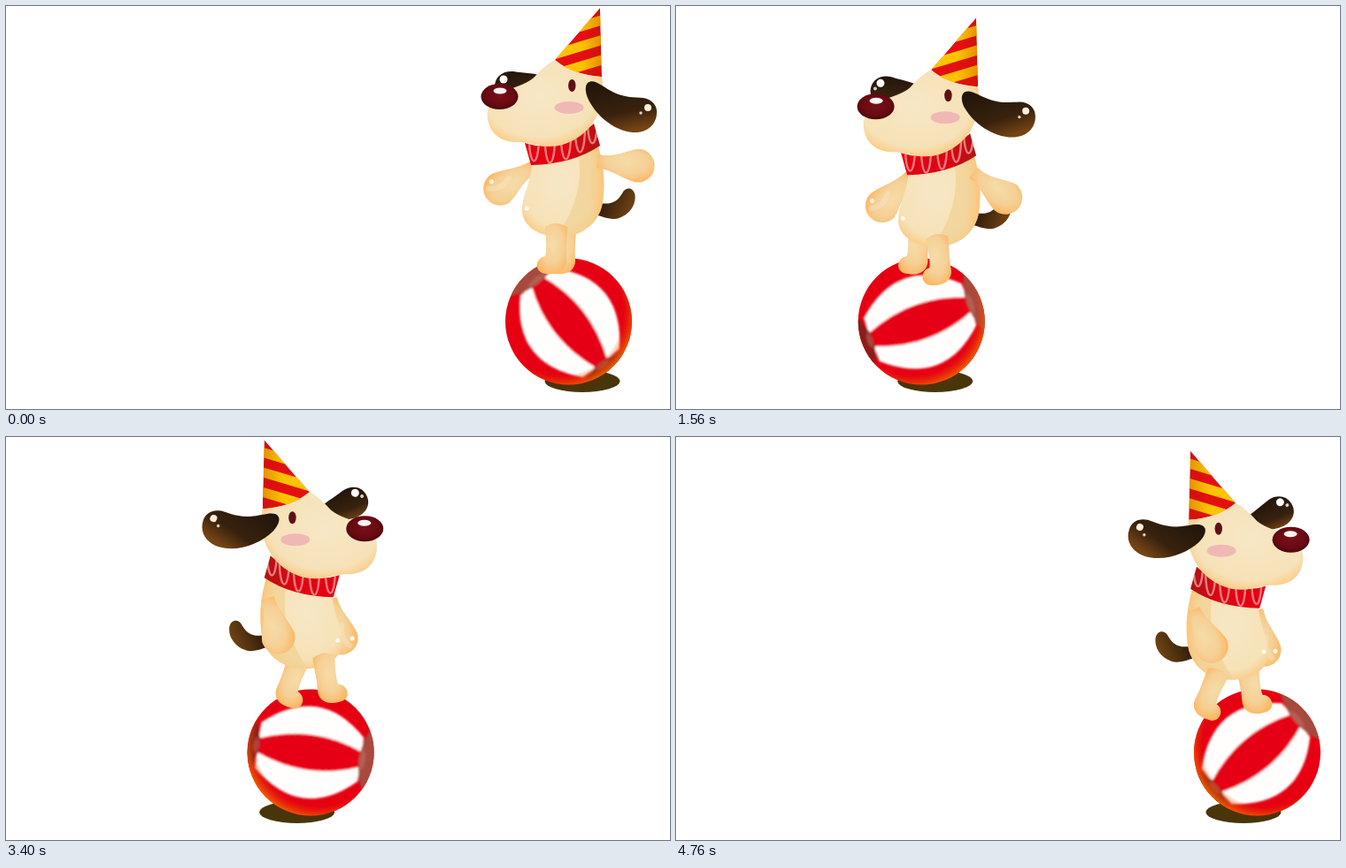
An HTML page for the animation above (4800 ms loop, 750 px wide and 456 px high).

```html
<!DOCTYPE html>
<html lang="en">
<head>
<meta charset="utf-8">
<title>Dog on a ball</title>
<style>
html, body { margin: 0; width: 100%; height: 100%; overflow: hidden; background: #fff; }
svg { display: block; width: 750px; height: 456px; }
</style>
</head>
<body>
<svg viewBox="0 0 750 456" xmlns="http://www.w3.org/2000/svg">
<defs>
  <radialGradient id="skin" cx=".45" cy=".42" r=".62">
    <stop offset="0" stop-color="#f7e7c5"/><stop offset=".76" stop-color="#f6e2b8"/><stop offset="1" stop-color="#fcc880"/>
  </radialGradient>
  <radialGradient id="limb" cx=".5" cy=".42" r=".62">
    <stop offset="0" stop-color="#f6dca8"/><stop offset=".6" stop-color="#f5d096"/><stop offset="1" stop-color="#fdb762"/>
  </radialGradient>
  <linearGradient id="side" x1="0" y1="0" x2="1" y2="0">
    <stop offset="0" stop-color="#efd49a"/><stop offset=".7" stop-color="#f1d192"/><stop offset="1" stop-color="#fcc070"/>
  </linearGradient>
  <linearGradient id="ear" x1=".2" y1="0" x2=".5" y2="1">
    <stop offset="0" stop-color="#22150a"/><stop offset=".65" stop-color="#38220e"/><stop offset="1" stop-color="#744414"/>
  </linearGradient>
  <linearGradient id="tail" gradientUnits="userSpaceOnUse" x1="672" y1="222" x2="706" y2="238">
    <stop offset="0" stop-color="#2e1c0b"/><stop offset="1" stop-color="#754614"/>
  </linearGradient>
  <radialGradient id="nose" cx=".5" cy=".45" r=".55">
    <stop offset="0" stop-color="#780f18"/><stop offset=".7" stop-color="#690a12"/><stop offset="1" stop-color="#4c070c"/>
  </radialGradient>
  <radialGradient id="shade" gradientUnits="userSpaceOnUse" cx="-9" cy="-10" r="85">
    <stop offset=".83" stop-color="#e04000" stop-opacity="0"/><stop offset="1" stop-color="#f06400" stop-opacity=".95"/>
  </radialGradient>
  <linearGradient id="band" x1="0" y1="0" x2="1" y2="0">
    <stop offset="0" stop-color="#e60012"/><stop offset=".6" stop-color="#dd0613"/><stop offset="1" stop-color="#b01414"/>
  </linearGradient>
  <linearGradient id="hatShade" x1="0" y1="0" x2="1" y2="0">
    <stop offset=".55" stop-color="#a01800" stop-opacity="0"/><stop offset="1" stop-color="#a01800" stop-opacity=".3"/>
  </linearGradient>
  <clipPath id="round"><circle r="71.5"/></clipPath>
  <clipPath id="cone"><path id="hatPath" d="M671,2 L620,61 Q640,78 673,80 Z"/></clipPath>
  <clipPath id="neck"><path id="collarPath" d="M586,155 Q625,168 664,133 L671,158 Q640,179 593,180 Z"/></clipPath>
  <filter id="soft" x="-10%" y="-10%" width="120%" height="120%"><feGaussianBlur stdDeviation="1.2"/></filter>
  <path id="arm" d="M0,-7 C22,-6 30,-16 46,-19 A19,19 0 1 1 46,19 C30,17 18,8 0,8 Z" fill="url(#limb)"/>
  <path id="leg" d="M-12,-4 C-11,10 -10,22 -12,29 C-24,31 -25,49 -10,49 C4,51 13,44 12,32 C11,20 13,8 13,-4 Q0,-12 -12,-4 Z" fill="url(#limb)"/>
</defs>
<g id="scene">
  <g id="ball">
    <ellipse cx="15.5" cy="67.5" rx="42.5" ry="12.5" fill="#49350a"/>
    <circle r="71.5" fill="#e60012"/>
    <g clip-path="url(#round)">
      <g id="spin">
        <g filter="url(#soft)">
          <path d="M-57,-25 Q0,-79 60,-26 V26 Q0,79 -57,25 Z" fill="#fffefc"/>
          <path d="M-58,-8 Q0,-32 60,-8 V8 Q0,32 -58,8 Z" fill="#e60012"/>
          <path d="M-63,-34 Q-47,0 -63,34 L-80,34 V-34 Z" fill="#a8483e"/>
          <path d="M-59,-14 Q-52,0 -59,14 Q-66,0 -59,-14 Z" fill="#bd7468" opacity=".5"/>
          <path d="M66,-28 Q51,0 66,28 L80,28 V-28 Z" fill="#8c1a17"/>
          <path d="M62,-10 Q55,0 62,10 Q69,0 62,-10 Z" fill="#bd6258" opacity=".6"/>
        </g>
      </g>
    </g>
    <circle r="71.5" fill="url(#shade)"/>
  </g>
  <g id="dog">
    <path d="M664,221 C680,226 689,224 696,212 C700,204 709,205 710.5,214 C712,228 700,240 687,241 C678,241 672,237 664,236 Z" fill="url(#tail)"/>
    <use id="legB" href="#leg"/>
    <g id="armL"><use href="#arm"/><path d="M32,5 Q45,-2 57,7" fill="none" stroke="#f9ecd0" stroke-width="6" stroke-linecap="round" opacity=".35"/><circle cx="50" cy="12" r="2.6" fill="#fff" opacity=".8"/></g>
    <path d="M595,170 C594,200 583,212 583,231 C583,249 602,262 628,261 C655,260 671,242 674,222 C677,198 675,180 668,155 Z" fill="url(#skin)"/>
    <path d="M646,165 C652,195 645,228 622,260 C652,262 671,243 674,222 C677,198 675,180 668,155 Z" fill="url(#side)" opacity=".75"/>
    <circle cx="588" cy="229" r="2.5" fill="#fff" opacity=".8"/>
    <use id="legF" href="#leg"/>
    <use href="#collarPath" fill="url(#band)"/>
    <g clip-path="url(#neck)"><g id="pleats" fill="none" stroke="#ffb9b4" stroke-width="2.4" opacity=".65"></g></g>
    <g id="earL">
      <path d="M610,80 C598,76 586,76 573,74 C560,73 552,81 552,91 C552,103 562,109 573,108 C588,106 596,98 610,94 Z" fill="url(#ear)"/>
      <circle cx="562" cy="83" r="4.5" fill="#fff"/><circle cx="557" cy="90" r="2" fill="#fff" opacity=".8"/>
    </g>
    <path d="M620,61 C612,65 605,71 599,78 C591,88 576,91 561,97 C549,104 542,114 544,127 C546,143 557,153 575,154 C586,154 592,156 603,158 C630,163 652,148 663,132 C672,118 677,102 673,80 Q650,58 620,61 Z" fill="url(#skin)"/>
    <ellipse cx="557.5" cy="102.5" rx="21" ry="14.5" fill="url(#nose)"/>
    <ellipse cx="558" cy="96" rx="7.5" ry="3.5" fill="#fff" opacity=".95"/>
    <ellipse cx="639.3" cy="90" rx="4.2" ry="7" fill="#5e1016"/>
    <ellipse cx="636" cy="115" rx="16.5" ry="7" fill="#f0b8b5"/>
    <g clip-path="url(#cone)">
      <use href="#hatPath" fill="#e60f10"/>
      <g id="stripes" stroke="#ffc400" stroke-width="11"></g>
      <use href="#hatPath" fill="url(#hatShade)"/>
    </g>
    <g id="earR">
      <path d="M657,87 C664,81 674,92 687,98 C700,104 710,103 720,104 C731,106 736,114 735,122 C734,136 722,144 708,143 C685,141 665,122 657,104 C654,97 654,90 657,87 Z" fill="url(#ear)"/>
      <circle cx="725" cy="115" r="4" fill="#ffeeda"/><circle cx="717" cy="121" r="1.7" fill="#fff" opacity=".8"/>
    </g>
    <use id="armR" href="#arm"/>
  </g>
</g>
</svg>
<script>
const STEP = 40, HALF = 60;
const $ = id => document.getElementById(id);
const put = (id, value) => $(id).setAttribute('transform', value);

$('pleats').innerHTML = [[591, 158], [609, 160], [627, 156], [643, 148], [657, 138]]
  .map(([x, y]) => `<path d="M${x},${y - 4} C${x + 1},${y + 24} ${x + 10},${y + 26} ${x + 11},${y - 8}"/>`).join('');
$('stripes').innerHTML = [17, 39.5, 62]
  .map(y => `<line x1="600" y1="${y + 21}" x2="690" y2="${y - 6}"/>`).join('');

function placeLeg(id, stride, x, y) {
  const turn = stride > 0 ? 8 * stride : 24 * stride;
  put(id, `translate(${x - 20 * stride},${y - 3 * stride}) rotate(${turn})`);
}

function draw(ms) {
  const n = Math.floor(ms / STEP) % (2 * HALF);
  const f = n % HALF;
  put('scene', n < HALF ? '' : 'translate(750,0) scale(-1,1)');

  put('ball', `translate(${635.5 - 9.186 * f},357)`);
  put('spin', `rotate(${52 + 12 * f})`);

  const bob = 15 * (1 - Math.abs(1 - (f % 24) / 12));
  put('dog', `translate(${-8.51 * f},${bob})`);

  // Legs swing both ways; arms and ears flap once per stride.
  const a = Math.PI * f / 36, lead = Math.cos(a);
  const stride = Math.max(-1, Math.min(1, 1.1 * Math.sin(a)));
  const flap = Math.abs(stride);
  placeLeg('legF', stride, 621, 254);
  placeLeg('legB', -stride, 621 + 10 * lead, 254 - 7 * (1 - lead) * (1 - flap));
  put('armL', `translate(597,182) rotate(${147.6 - 46 * flap})`);
  put('armR', `translate(668,${175 + 7 * flap}) rotate(${7 + 110 * flap})`);
  put('earL', `rotate(${32 * flap},606,85)`);
  put('earR', `rotate(${-23.5 * flap},662,94)`);
}

function tick() {
  draw(performance.now());
  requestAnimationFrame(tick);
}
tick();
</script>
</body>
</html>
```
